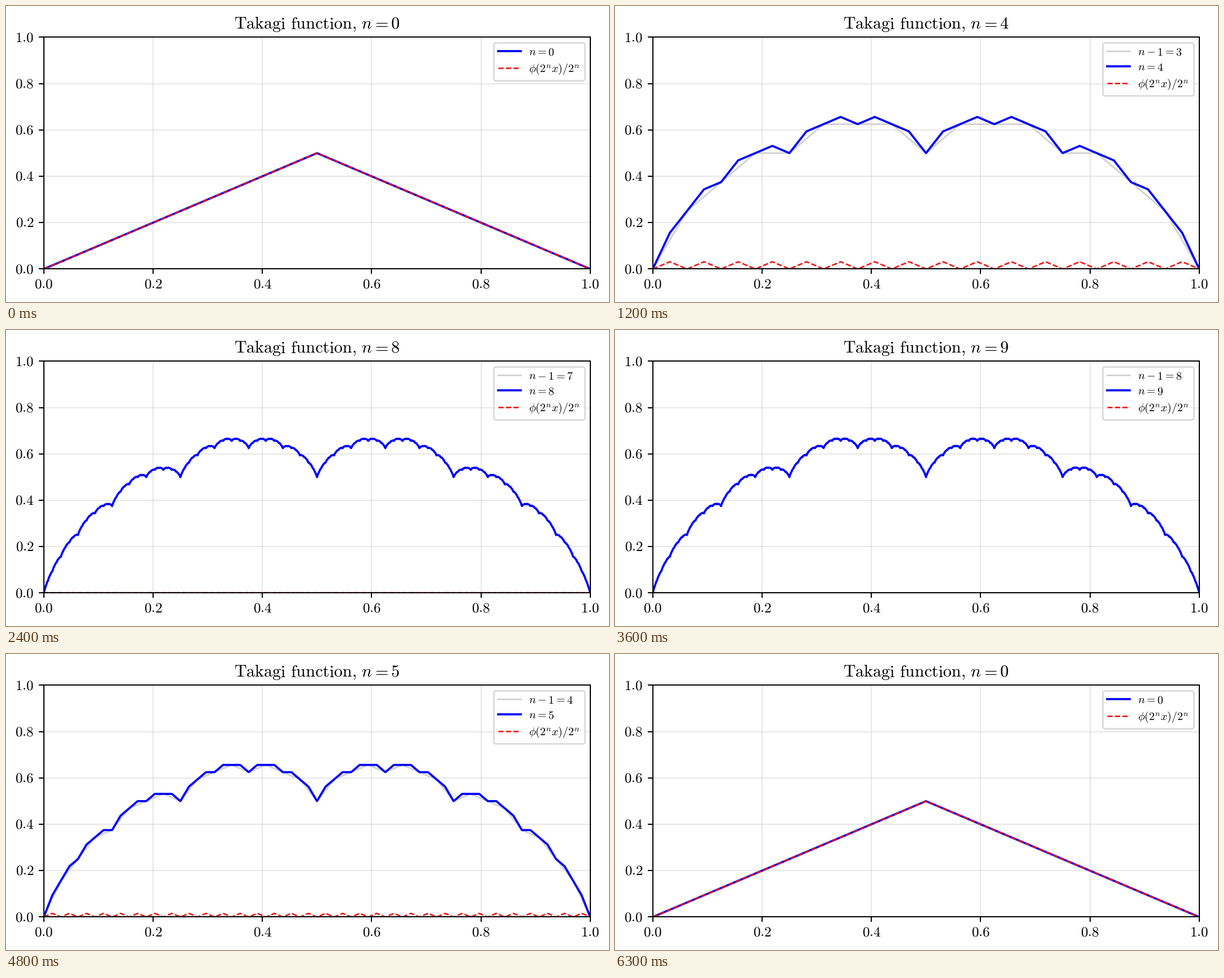
Animation, 1066 px wide and 525 px high, one loop 6600 ms. Source, as a matplotlib script:

```python
import numpy as np
import matplotlib.pyplot as plt
from matplotlib.animation import FuncAnimation
from matplotlib.ticker import FuncFormatter

W, H, DPI = 1066, 525, 180
LEFT, RIGHT, TOP, BOTTOM = 66.8, 1032.8, 55.45, 466.45
LAST = 10
STEPS = list(range(LAST + 1)) + list(range(LAST, -1, -1))

plt.rcParams.update({
    "font.family": "Liberation Serif",
    "mathtext.fontset": "cm",
    "font.size": 10,
    "text.hinting": "none",
    "legend.fontsize": 8,
    "legend.labelspacing": 0.435,
    "legend.handletextpad": 0.7,
})

x = np.linspace(0, 1, 2 ** (LAST + 1) + 1)


def wave(n):
    """Triangle wave: distance of 2^n x to the nearest integer, over 2^n."""
    t = 2 ** n * x
    return np.abs(t - np.round(t)) / 2 ** n


waves = [wave(n) for n in range(LAST + 1)]
sums = np.cumsum(waves, axis=0)

fig = plt.figure(figsize=(W / DPI, H / DPI), dpi=DPI, facecolor="white")
ax = fig.add_axes([LEFT / W, 1 - BOTTOM / H,
                   (RIGHT - LEFT) / W, (BOTTOM - TOP) / H])
ax.set(xlim=(0, 1), ylim=(0, 1))
ax.grid(alpha=0.3)
for axis in (ax.xaxis, ax.yaxis):
    axis.set_major_formatter(FuncFormatter(lambda v, _: rf"$\mathrm{{{v:.1f}}}$"))

before, = ax.plot([], [], color="lightgray", lw=1.2)
curve, = ax.plot([], [], color="blue", lw=1.5)
term, = ax.plot([], [], color="red", ls="--", lw=1)
term.set_label(r"$\phi(2^n x)/2^n$")
title = ax.set_title("")


def draw(i):
    n = STEPS[i]
    curve.set_data(x, sums[n])
    curve.set_label(f"$n={n}$")
    term.set_data(x, waves[n])
    handles = [curve, term]
    if n > 0:
        before.set_data(x, sums[n - 1])
        before.set_label(f"$n-1={n - 1}$")
        handles.insert(0, before)
    else:
        before.set_data([], [])
    ax.legend(handles=handles, loc="upper right")
    title.set_text(r"$\mathrm{Takagi}\hspace{0.38}\mathrm{function,}"
                   rf"\hspace{{0.16}}n={n}$")
    return before, curve, term, title


anim = FuncAnimation(fig, draw, frames=len(STEPS), interval=300,
                     init_func=lambda: draw(0), repeat=True, repeat_delay=0)
plt.show()
```
